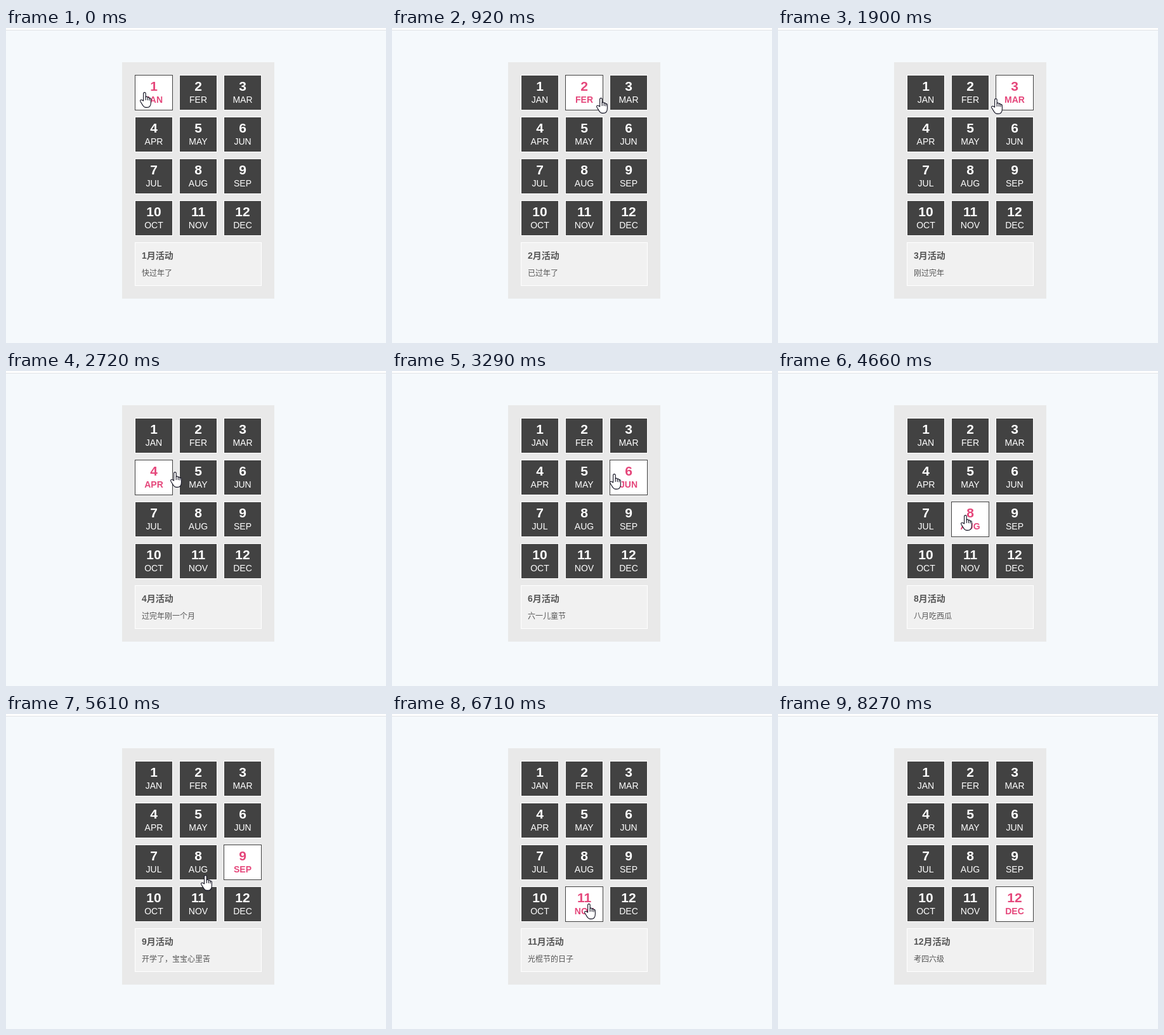
An HTML page for the animation above (8.55 s loop, 599 by 497 pixels).

```html
<!DOCTYPE html>
<html lang="zh-CN">
<head>
<meta charset="utf-8">
<title>Months</title>
<style>
  html, body { margin: 0; width: 100%; height: 100%; overflow: hidden; background: #f5f9fc; }
  svg { display: block; width: 599px; height: 497px; }
  text { font-family: "Liberation Sans", Arial, "Noto Sans CJK SC", "Noto Sans CJK", sans-serif; }
  .cell rect { fill: #424242; stroke: #fff; }
  .cell text { fill: #fff; font-size: 14px; text-anchor: middle; }
  .cell .num { font-size: 21px; font-weight: bold; }
  .cell.on rect { fill: #fff; stroke: #424242; }
  .cell.on text { fill: #e5477b; font-weight: bold; }
  .info { fill: #555; font-size: 12px; }
  .info.head { font-size: 14px; font-weight: bold; }
  .cursor { fill: #fff; stroke: #101020; stroke-width: 1.1; stroke-linejoin: round; stroke-linecap: round; }
</style>
</head>
<body>
<svg id="stage" viewBox="0 0 599 497">
  <rect width="599" height="497" fill="#f5f9fc"/>
  <rect width="599" height="3" fill="#fff"/>
  <rect y="3" width="599" height="1" fill="#e1e4e6"/>
  <rect x="183" y="54" width="240" height="373" fill="#e9e9e9"/>
  <g id="grid"></g>
  <rect x="203.5" y="338.5" width="199" height="68" fill="#f1f1f1" stroke="#fff"/>
  <text id="head" class="info head" x="214" y="364"></text>
  <text id="note" class="info" x="214" y="391"></text>
  <g id="hand" class="cursor">
    <path d="M5.6 14V2.4Q5.6.6 7.4.6T9.2 2.4V8Q9.6 7 11 7.2T12.3 8.7Q12.8 8 13.7 8.2T15.1 9.8Q17.4 9 17.4 11.5V16.5Q17.4 24.4 11 24.4H9.8Q6.6 24.4 5 21.6L.9 15Q.1 13.5 1.1 12.6T3.8 12.8Z"/>
    <path fill="none" d="M9.2 8V12.4M12.3 8.7V12.6M15.1 9.8V13"/>
  </g>
  <path id="arrow" class="cursor" d="M.5.6V16.4L4.1 13L6.5 18.4L8.9 17.4L6.6 12.1H11.4Z"/>
</svg>
<script>
const LOOP = 8550;
const ARROW_FROM = 7700;
const MONTHS = "JAN FER MAR APR MAY JUN JUL AUG SEP OCT NOV DEC".split(" ");
const NOTES = ["快过年了", "已过年了", "刚过完年", "过完年刚一个月", "五月劳动节", "六一儿童节",
  "七月放暑假", "八月吃西瓜", "开学了，宝宝心里苦", "国庆节放假", "光棍节的日子", "考四六级"];

// time, pointer x, pointer y
const PATH = [
  [0, 211, 101], [400, 230, 103], [520, 268, 106], [650, 290, 109], [920, 322, 110], [1040, 362, 108],
  [1900, 336, 111], [2020, 288, 115], [2170, 248, 146], [2290, 240, 156], [2440, 238, 156],
  [2720, 259, 159], [2840, 278, 161], [2990, 281, 161], [3140, 288, 161],
  [3290, 343, 162], [3440, 355, 163], [3560, 358, 163],
  [3830, 314, 173], [3960, 276, 188], [4110, 226, 219], [4540, 250, 223], [4660, 288, 227],
  [4940, 320, 231], [5060, 374, 235], [5490, 358, 240], [5610, 307, 254],
  [5760, 207, 308], [5910, 200, 316], [6310, 234, 312], [6430, 282, 304], [6710, 303, 299], [6830, 372, 295],
  [7700, 522, 342], [7850, 567, 424], [8000, 581, 487], [8150, 581, 491], [8270, 581, 520]
];

const $ = id => document.getElementById(id);

function add(parent, tag, attrs, text = "") {
  const el = document.createElementNS("http://www.w3.org/2000/svg", tag);
  for (const key in attrs) el.setAttribute(key, attrs[key]);
  el.textContent = text;
  return parent.appendChild(el);
}

const cells = MONTHS.map((name, i) => {
  const x = 203 + i % 3 * 70;
  const y = 74 + Math.floor(i / 3) * 66;
  const el = add($("grid"), "g", { class: "cell" });
  add(el, "rect", { x: x + .5, y: y + .5, width: 59, height: 55 });
  add(el, "text", { x: x + 30, y: y + 25, class: "num" }, i + 1);
  add(el, "text", { x: x + 30, y: y + 44 }, name);
  return { el, x, y };
});

// A cell stays active until the pointer enters another one
let active = 0;
const steps = PATH.map(([time, x, y]) => {
  const dx = x + 6, dy = y + 8;
  const hit = cells.findIndex(c => dx >= c.x && dx < c.x + 60 && dy >= c.y && dy < c.y + 56);
  if (hit >= 0) active = hit;
  return { time, x, y, active };
});

let shown;

function show(step) {
  if (step === shown) return;
  shown = step;
  cells.forEach((cell, i) => cell.el.classList.toggle("on", i === step.active));
  $("head").textContent = step.active + 1 + "月活动";
  $("note").textContent = NOTES[step.active];
  const isArrow = step.time >= ARROW_FROM;
  $("hand").style.display = isArrow ? "none" : "";
  $("arrow").style.display = isArrow ? "" : "none";
  $(isArrow ? "arrow" : "hand").setAttribute("transform", `translate(${step.x} ${step.y})`);
}

const start = performance.now();

function tick() {
  const t = Math.max(0, performance.now() - start) % LOOP;
  show(steps.findLast(step => step.time <= t));
  requestAnimationFrame(tick);
}
tick();
</script>
</body>
</html>
```
